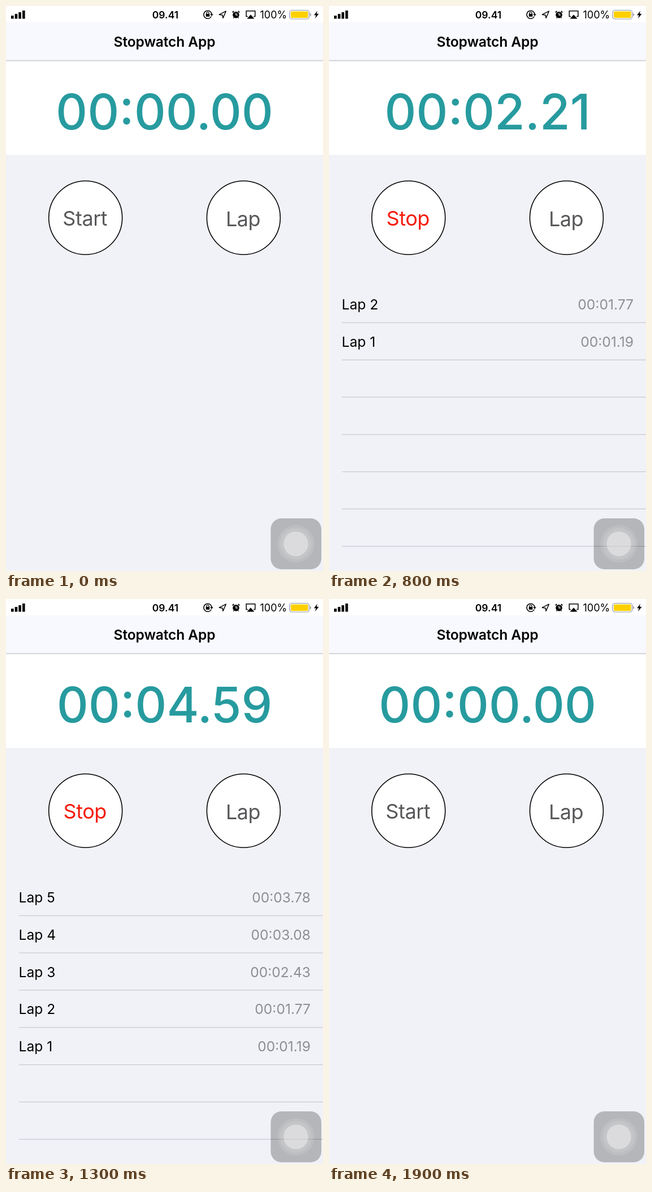
Write an HTML page that moves like this. It is 561 by 998 pixels and loops after 2 s.

```html
<!DOCTYPE html>
<html lang="en">
<head>
<meta charset="utf-8">
<title>Stopwatch</title>
<style>
  html, body { margin: 0; width: 100%; height: 100%; overflow: hidden; background: #f1f2f8; }
  svg { display: block; width: 100%; height: 100%; font-family: Inter, Roboto, sans-serif; }
  .mid { text-anchor: middle; }
  .bold { font-weight: 600; }
  .clock { font-size: 87px; font-weight: 500; fill: #279b9f; }
  .clock, .time { font-feature-settings: "case"; }
  .button circle { fill: #fff; stroke: #000; stroke-width: 1.6; }
  .button text { font-size: 36px; letter-spacing: -.5px; fill: #58585b; text-anchor: middle; }
  .row { font-size: 24.6px; }
  .row .time { fill: #8e8e93; text-anchor: end; }
  .row path { stroke: #c9c9ce; stroke-width: 1.2; }
</style>
</head>
<body>
<svg viewBox="0 0 561 998">
  <rect width="561" height="998" fill="#f1f2f8"/>
  <rect width="561" height="263" fill="#fff"/>
  <rect y="29" width="561" height="67" fill="#f8f9fe"/>
  <path d="M0 96.5H561" stroke="#c6c7cb" stroke-width="1.4"/>

  <!-- status bar -->
  <path d="M9 17h4.6v5.5h-4.6zM15.7 14h4.6v8.5h-4.6zM22.3 11h4.6v11.5h-4.6zM29 8h4.6v14.5h-4.6z"/>
  <text class="mid bold" x="282" y="21.5" font-size="17.5">09.41</text>
  <g fill="none" stroke="#000" stroke-width="1.5">
    <path d="M363.2 18.5A7 7 0 1 1 364 15"/>
    <path d="M354.9 14v-1.4a2.1 2.1 0 0 1 4.2 0V14" stroke-width="1.2"/>
    <path d="M377.3 15.2 389.3 9.2 384 21.2 383.1 16Z" stroke-linejoin="round"/>
    <path d="M428 18.5H425.2V8.7H440.8V18.5H438"/>
    <path d="M400.8 11.4 403.2 9M413.2 11.4 410.8 9" stroke-width="1.8"/>
    <path d="M403.4 20.2 402.4 21.6M410.6 20.2 411.6 21.6" stroke-width="1.3"/>
  </g>
  <path d="M361.3 14.2h5.4l-2.7 3.7zM353.7 13.7h6.6v5h-6.6zM426.5 22.6 433 15.2 439.5 22.6z"/>
  <circle cx="407" cy="15.7" r="5.8"/>
  <path d="M407 12V15.9H410" fill="none" stroke="#fff" stroke-width="1.2"/>
  <text x="449.5" y="21.8" font-size="18">100%</text>
  <rect x="502" y="7.5" width="34.5" height="15.5" rx="4" fill="#fff" stroke="#8d93a2" stroke-width="1.2"/>
  <rect x="504" y="9.5" width="30.5" height="11.5" rx="2" fill="#ffd000"/>
  <path d="M538 12.5q2 .5 2 2.8t-2 2.8z" fill="#8d93a2"/>
  <path d="M551 8.5 545 16.2h3.6L547 22 553.5 13.8h-3.8z"/>

  <text class="mid bold" x="280.5" y="72" font-size="24.6" letter-spacing="-.15">Stopwatch App</text>
  <text id="clock" class="mid clock" x="280.5" y="217.5"></text>

  <g class="button">
    <circle cx="140.7" cy="374" r="65"/>
    <text id="toggle" x="139.7" y="388"></text>
  </g>
  <g class="button">
    <circle cx="420.4" cy="374" r="65"/>
    <text x="419.5" y="389">Lap</text>
  </g>

  <g id="table"></g>

  <!-- floating button -->
  <rect x="468.5" y="905" width="89.5" height="90" rx="19" fill="#000" fill-opacity=".25"/>
  <g fill="#fff">
    <circle cx="513" cy="950" r="33" fill-opacity=".1"/>
    <circle cx="513" cy="950" r="28" fill-opacity=".1"/>
    <circle cx="513" cy="950" r="21.8" fill-opacity=".38"/>
  </g>
</svg>
<script>
  const LOOP = 2000, STEP = 100, START = 400, STOP = 1700, RESET = 1800;
  const ROWS = 7, PITCH = 65.83;
  const LAPS = [1.19, 1.77, 2.43, 3.08, 3.78, 4.71];
  // [playback ms, stopwatch seconds]
  const KEYS = [[400, .29], [600, 1.26], [900, 2.69], [1100, 3.63], [1500, 5.55], [1600, 6.03]];

  const byId = id => document.getElementById(id);
  const clock = byId('clock'), toggle = byId('toggle'), table = byId('table');

  function add(parent, tag, attrs) {
    const el = document.createElementNS('http://www.w3.org/2000/svg', tag);
    for (const name in attrs) el.setAttribute(name, attrs[name]);
    return parent.appendChild(el);
  }

  function setText(el, text) {
    if (el.textContent !== text) el.textContent = text;
  }

  const rows = Array.from({ length: ROWS }, (_, i) => {
    const g = add(table, 'g', { class: 'row', transform: `translate(0 ${i * PITCH})` });
    add(g, 'path', { d: 'M23 559.3H561' });
    return {
      name: add(g, 'text', { x: 22.5, y: 536 }),
      time: add(g, 'text', { x: 539, y: 536, class: 'time' })
    };
  });

  function elapsed(t) {
    if (t < START || t >= RESET) return 0;
    for (let i = 1; i < KEYS.length; i++) {
      const [t0, s0] = KEYS[i - 1], [t1, s1] = KEYS[i];
      if (t <= t1) return s0 + (s1 - s0) * (t - t0) / (t1 - t0);
    }
    return KEYS[KEYS.length - 1][1];
  }

  function format(seconds) {
    const cs = Math.round(seconds * 100);
    const pad = n => String(n).padStart(2, '0');
    return `${pad(Math.floor(cs / 6000))}:${pad(Math.floor(cs / 100) % 60)}.${pad(cs % 100)}`;
  }

  function render(ms) {
    const t = Math.floor(ms % LOOP / STEP) * STEP;
    const seconds = elapsed(t);
    const running = t >= START && t < STOP;
    const count = LAPS.filter(lap => lap <= seconds).length;

    setText(clock, format(seconds));
    setText(toggle, running ? 'Stop' : 'Start');
    toggle.style.fill = running ? '#f51c0a' : '';
    table.style.display = count ? '' : 'none';
    rows.forEach((row, i) => {
      const lap = count - i;
      setText(row.name, lap > 0 ? `Lap ${lap}` : '');
      setText(row.time, lap > 0 ? format(LAPS[lap - 1]) : '');
    });
  }

  const origin = performance.now();
  function tick() {
    render(performance.now() - origin);
    requestAnimationFrame(tick);
  }
  tick();
</script>
</body>
</html>
```
